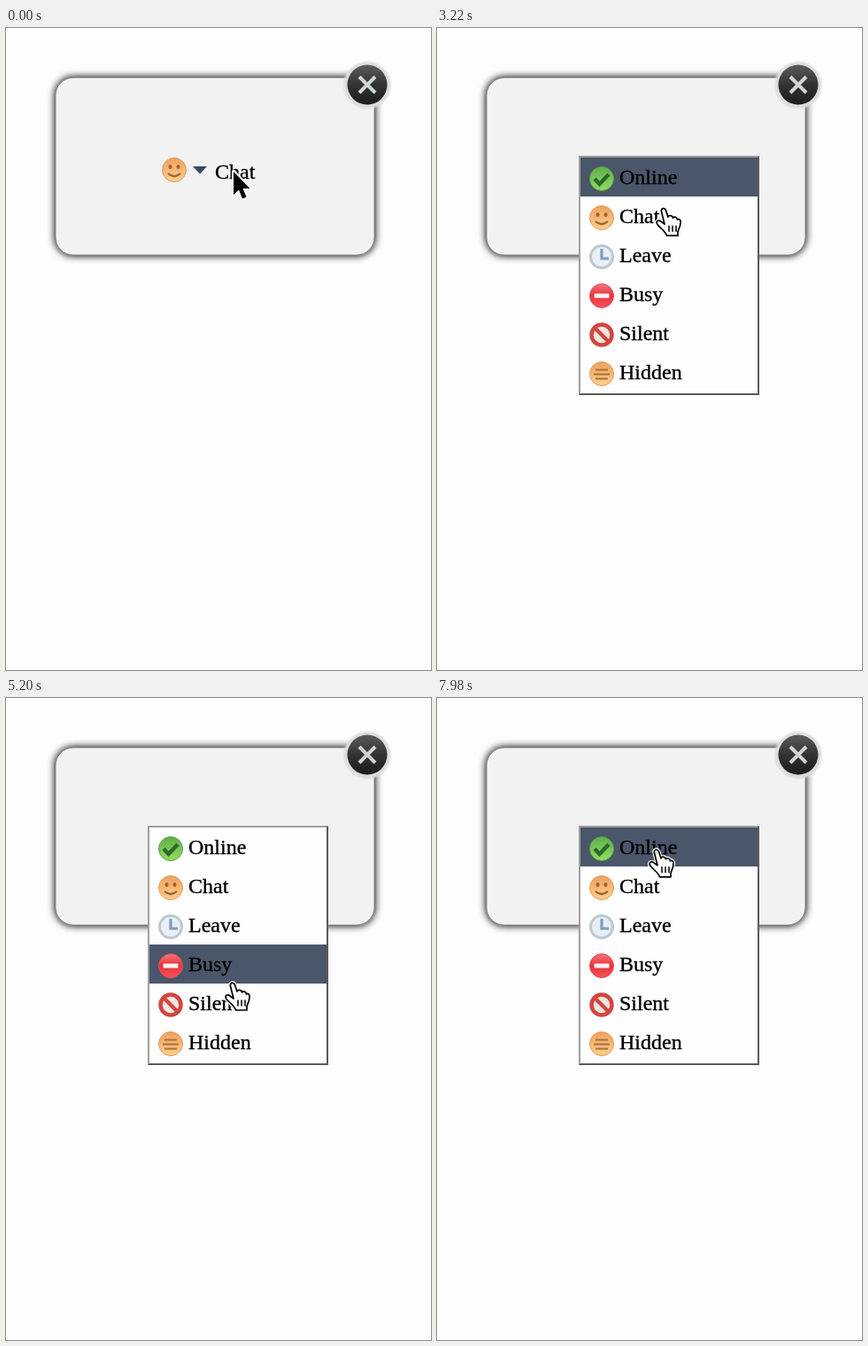
An HTML page for the animation above (8000 ms loop, 480 px wide and 724 px high).

```html
<!DOCTYPE html>
<html lang="en">
<head>
<meta charset="utf-8">
<title>Status menu</title>
<style>
  html, body { margin: 0; width: 100%; height: 100%; overflow: hidden; background: #fdfdfd; }
  svg { display: block; width: 100%; height: 100%; }
  text { font: 24px "Liberation Serif", "Times New Roman", serif; stroke: #000; stroke-width: .35; }
</style>
</head>
<body>
<svg viewBox="0 0 480 724">
  <defs>
    <linearGradient id="green" x2="0" y2="1"><stop stop-color="#5fae4a"/><stop offset="1" stop-color="#96dc62"/></linearGradient>
    <linearGradient id="orange" x2="0" y2="1"><stop stop-color="#f0a05c"/><stop offset="1" stop-color="#fdd08c"/></linearGradient>
    <linearGradient id="red" x2="0" y2="1"><stop stop-color="#f8767a"/><stop offset=".5" stop-color="#e8313b"/><stop offset="1" stop-color="#f6545a"/></linearGradient>
    <linearGradient id="dark" x2="0" y2="1"><stop stop-color="#5c5c5e"/><stop offset=".5" stop-color="#333335"/><stop offset="1" stop-color="#1c1c1e"/></linearGradient>
    <filter id="blur" x="-10%" y="-10%" width="120%" height="120%"><feGaussianBlur stdDeviation="4.5"/></filter>
    <filter id="soft" x="-20%" y="-20%" width="140%" height="140%"><feGaussianBlur stdDeviation="1"/></filter>

    <g id="Online">
      <circle r="13.5" fill="url(#green)" stroke="#5a9f4a"/>
      <path d="M-8 0L-2.5 6 8-5" fill="none" stroke="#2c6a2c" stroke-width="4.5"/>
    </g>
    <g id="Chat">
      <circle r="13.5" fill="url(#orange)" stroke="#e39a5c"/>
      <g fill="#9c6236"><ellipse cx="-4.5" cy="-3.5" rx="2" ry="2.6"/><ellipse cx="4.5" cy="-3.5" rx="2" ry="2.6"/></g>
      <path d="M-7 4Q0 10.5 7 4" fill="none" stroke="#9c6236" stroke-width="2.2"/>
    </g>
    <g id="Leave">
      <circle r="12.5" fill="#e9eef3" stroke="#bcc8d2" stroke-width="3"/>
      <path d="M0-9V2H8" fill="none" stroke="#7f9dc0" stroke-width="3.2"/>
    </g>
    <g id="Busy">
      <circle r="13.5" fill="url(#red)" stroke="#e0505a"/>
      <rect x="-8.5" y="-2.5" width="17" height="5" rx="1" fill="#fff4f2"/>
    </g>
    <g id="Silent">
      <circle r="11.5" fill="#f3e6e0" stroke="#d2463f" stroke-width="4.5"/>
      <path d="M-8-8L8 8" stroke="#d2463f" stroke-width="4.5"/>
    </g>
    <g id="Hidden">
      <circle r="13.5" fill="url(#orange)" stroke="#e39a5c"/>
      <path d="M-7-4.5H7M-9 .5H9M-7 5.5H7" stroke="#a8703f" stroke-width="2.2"/>
    </g>

    <path id="arrowShape" d="M0 2V28L6 22.5 10 32.5 14.5 30.5 10.5 21H18.5Z"/>
    <path id="handShape" d="M7.5 4C6.500 0 11 -1 12.500 2.500L15 10C16 7.500 20 8 20.500 11C22 9 25 10 25.500 13C27.500 11.500 29.500 13.500 29 16.500C29 22 26 24 26 27.500V31H13.500C12.500 26.500 6.500 23 3 18.500C.5 15 4 12.500 7 15L11 18Z"/>
  </defs>

  <rect width="480" height="724" fill="#fdfdfd"/>
  <rect x="55" y="55" width="362" height="202" rx="21" fill="#111" filter="url(#blur)"/>
  <rect x="56" y="56" width="360" height="200" rx="20" fill="#f2f2f2" stroke="#77777a" stroke-width=".8"/>

  <g transform="translate(408 64)">
    <circle cy=".5" r="26.5" fill="#dcdcde" filter="url(#soft)"/>
    <circle r="22.5" fill="url(#dark)"/>
    <path d="M-9-9L9 9M9-9L-9 9" stroke="#cfd4d8" stroke-width="4"/>
  </g>

  <g id="label">
    <use id="statusIcon" x="190" y="160"/>
    <path d="M211 156H227L219 164.5Z" fill="#35495f"/>
    <text id="statusText" x="236" y="170"></text>
  </g>

  <g id="menu">
    <rect x="160" y="144" width="204" height="270" fill="#5a5a5c"/>
    <path d="M160 414V144H364L362 146H162V412Z" fill="#a0a0a2"/>
    <rect x="162" y="146" width="200" height="266" fill="#fefefe"/>
    <rect id="highlight" x="162" width="200" height="44" fill="#4a5669"/>
    <g id="items"></g>
  </g>

  <g id="arrow" stroke-linejoin="round">
    <use href="#arrowShape" stroke="#fff" stroke-width="4"/>
    <use href="#arrowShape"/>
  </g>
  <g id="hand" stroke-linejoin="round" stroke-linecap="round" fill="#fff">
    <use href="#handShape" stroke="#fff" stroke-width="4"/>
    <use href="#handShape" stroke="#000" stroke-width="1.7"/>
    <path d="M16 20V26M20 20V26M24 20V26" stroke="#000" stroke-width="1.5"/>
  </g>
</svg>
<script>
const LOOP = 8000, ROW_TOP = 146, ROW_HEIGHT = 44, HOVER_LAG = 80;
const STATUSES = ["Online", "Chat", "Leave", "Busy", "Silent", "Hidden"];
// The menu opens, a row lights up, and closing picks the next status.
const SESSIONS = [
  { open: 2320, hover: 2420, close: 2600, picks: "Online" },
  { open: 3000, hover: 3060, close: 5480, picks: "Busy" },
  { open: 7200, hover: 7560, close: LOOP, picks: "Online" }
];
// Pointer hot spot: time, x, y.
const PATH = [
  [0, 257, 160], [700, 257, 160], [1200, 232, 180], [1900, 251, 162],
  [3060, 251, 162], [3220, 257, 200], [3800, 259, 278],
  [4400, 258, 345], [4800, 258, 342], [5080, 257, 318], [6160, 257, 318],
  [6750, 249, 163], [7500, 249, 163], [LOOP, 249, 168]
];
const $ = id => document.getElementById(id);
const show = (id, on) => $(id).style.display = on ? "" : "none";

$("items").innerHTML = STATUSES.map((name, i) => {
  const y = ROW_TOP + i * ROW_HEIGHT;
  return `<use href="#${name}" x="186" y="${y + 24}"/><text x="206" y="${y + 30}">${name}</text>`;
}).join("");

function pointerAt(t) {
  const i = Math.max(1, PATH.findIndex(p => p[0] >= t));
  const [t0, x0, y0] = PATH[i - 1], [t1, x1, y1] = PATH[i];
  const k = Math.max(0, (t - t0) / (t1 - t0));
  return [x0 + (x1 - x0) * k, y0 + (y1 - y0) * k];
}

function draw(t) {
  const session = SESSIONS.find(s => t >= s.open && t < s.close);
  const [x, y] = pointerAt(t);
  show("menu", session);
  show("label", !session);
  show("hand", session);
  show("arrow", !session);
  $("arrow").setAttribute("transform", `translate(${x} ${y})`);
  $("hand").setAttribute("transform", `translate(${x - 11} ${y + 3})`);

  show("highlight", session && t >= session.hover);
  const row = Math.floor((pointerAt(t - HOVER_LAG)[1] - ROW_TOP) / ROW_HEIGHT);
  $("highlight").setAttribute("y", ROW_TOP + row * ROW_HEIGHT);

  const status = SESSIONS.reduce((last, s) => t >= s.close ? s.picks : last, "Chat");
  $("statusIcon").setAttribute("href", "#" + status);
  $("statusText").textContent = status;
}

const start = performance.now();
function tick() {
  draw((performance.now() - start) % LOOP);
  requestAnimationFrame(tick);
}
tick();
</script>
</body>
</html>
```
